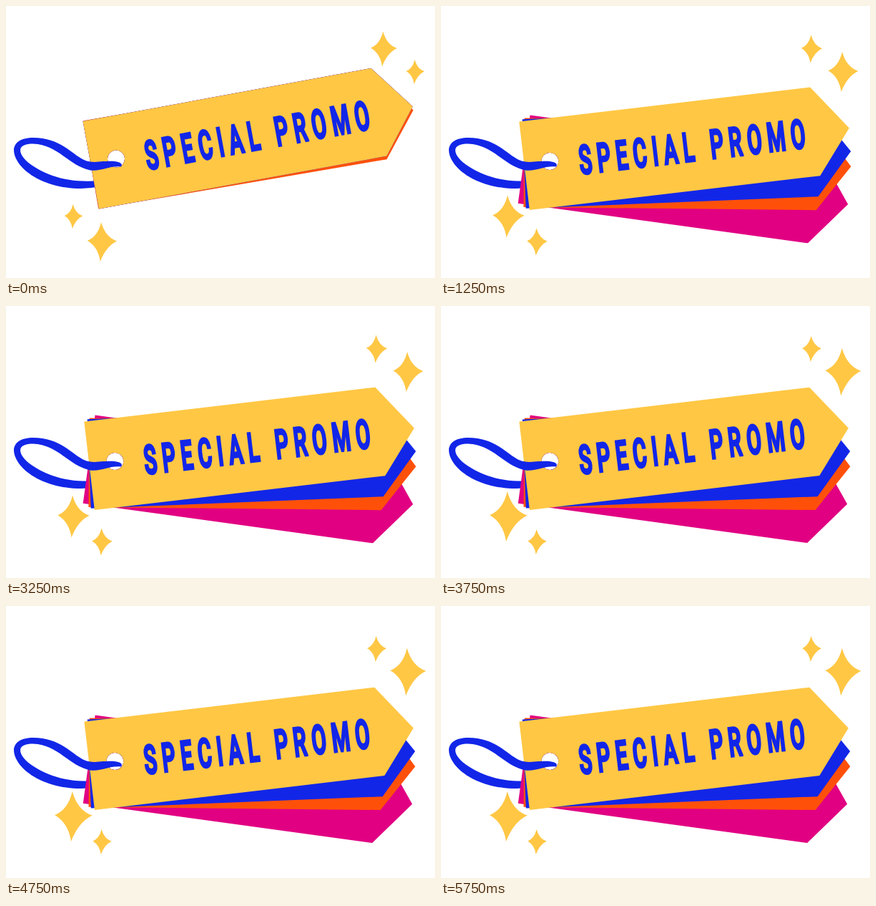
Write an HTML page that moves like this. It is 600 px wide and 380 px high and loops after 6 s.

```html
<!DOCTYPE html>
<html lang="en">
<head>
<meta charset="utf-8">
<title>Special promo</title>
<style>
  html, body { margin: 0; width: 100%; height: 100%; overflow: hidden; background: #fff; }
  svg { display: block; width: 100vw; height: 100vh; }
  .yellow { fill: #ffc744; }
  .blue { fill: #1226e8; }
  .orange { fill: #ff500a; }
  .magenta { fill: #e10082; }
  text {
    font: 500 55.5px Roboto, "Liberation Sans", sans-serif;
    letter-spacing: 14.3px;
    text-anchor: middle;
    stroke: #1226e8;
    stroke-width: 3;
    vector-effect: non-scaling-stroke;
  }
</style>
</head>
<body>
<svg viewBox="0 0 600 380">
  <defs>
    <!-- The hole is at the origin, so each tag swings around it. -->
    <path id="tag" fill-rule="evenodd"
      d="M-36.2 -60.2H373.6L421.2 2.8L373 64.3H-36.2Z M-12 0a12 12 0 1 0 24 0a12 12 0 1 0 -24 0Z"/>
    <path id="star" d="M-.05 -1Q.16 -.24 .75 -.04Q.2 .22 -.1 1Q-.2 .27 -.75 -.06Q-.22 -.27 -.05 -1Z"/>
  </defs>

  <path class="blue" d="M11 201C11 224 47 255 105 255Q118 255 132 252V244C106 246 85 244 65 237C41 228 20 214 20 201Z"/>

  <g id="tags">
    <use class="magenta" href="#tag"/>
    <use class="orange" href="#tag"/>
    <use class="blue" href="#tag"/>
    <g>
      <use class="yellow" href="#tag"/>
      <text class="blue" transform="translate(203.6 22.8) scale(.53 1)">SPECIAL PROMO</text>
    </g>
  </g>

  <path class="blue" d="M161 224.5Q164 220 157 218C151 216 141 217 136 217C127 218 118 219 109 215C92 207 76 184 38 184C22 184 11 190 11 202H20C20 195 27 192.5 38 192.5C74 194 87 223 118 229.5C135 231 144 223 161 224.5Z"/>

  <g id="stars" class="yellow"></g>
</svg>
<script>
  const STEP = 250;
  const CLOSED_ANGLE = -10.4;
  const OPEN_ANGLES = [7.8, 0.6, -2.3, -6.73]; // back to front

  // "peak" tells whether a star is large while the fan is open.
  const stars = [
    { x: 528.5, y: 60, large: 24.5, small: 19.5, peak: false, drift: -10 },
    { x: 572.5, y: 92, large: 28, small: 17, peak: true, drift: -10 },
    { x: 94.5, y: 294, large: 29.5, small: 17, peak: true, drift: 0 },
    { x: 134.5, y: 329.5, large: 27.5, small: 19, peak: false, drift: 0 },
  ];

  const tagNodes = [...document.getElementById('tags').children];
  const starGroup = document.getElementById('stars');
  const starNodes = stars.map(() => {
    const node = document.createElementNS('http://www.w3.org/2000/svg', 'use');
    node.setAttribute('href', '#star');
    return starGroup.appendChild(node);
  });

  const place = (node, x, y, angle, scale) =>
    node.setAttribute('transform', `translate(${x} ${y}) rotate(${angle}) scale(${scale})`);

  // The fan opens on odd steps; the second half of each cycle pulses harder.
  function show(step) {
    const open = step % 2 === 1;
    const strong = step >= 2;
    const [holeX, holeY] = open ? [152.3, 217] : [154, 213.6];

    tagNodes.forEach((node, i) => {
      const peek = i === 1 ? 0.7 : 0;
      const angle = open ? OPEN_ANGLES[i] : CLOSED_ANGLE + peek;
      place(node, holeX, holeY, angle, strong ? 0.9975 : 1);
    });

    stars.forEach((star, i) => {
      const size = star.peak === open
        ? star.large * (strong ? 1.19 : 1)
        : star.small * (strong ? 0.92 : 1);
      place(starNodes[i], star.x + (open ? star.drift : 0), star.y, 0, size);
    });
  }

  const start = performance.now();
  function tick() {
    show(Math.floor((performance.now() - start) / STEP) % 4);
    requestAnimationFrame(tick);
  }
  tick();
</script>
</body>
</html>
```
